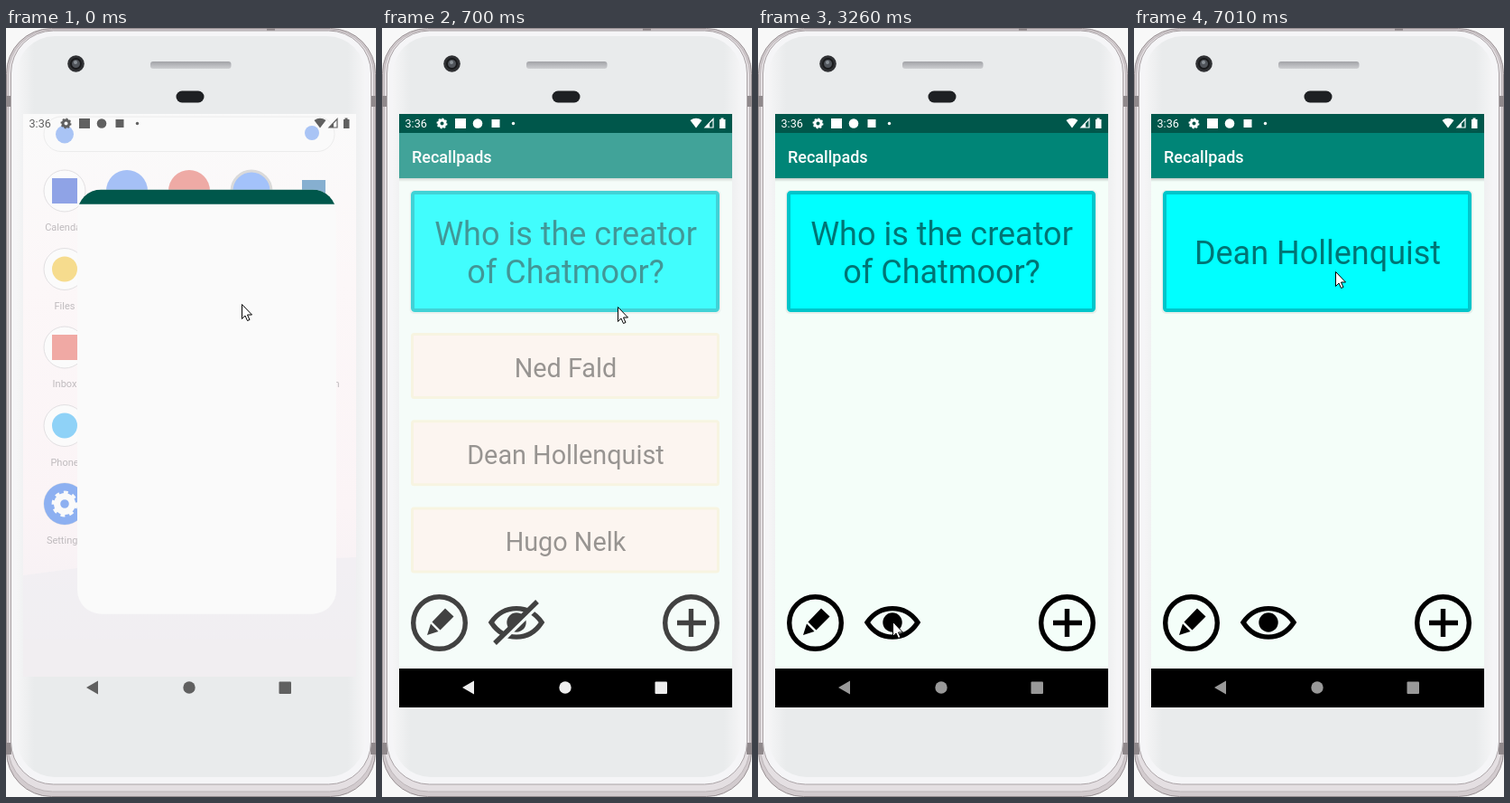
An HTML page for the animation above (8000 ms loop, 410 by 850 pixels).

```html
<!DOCTYPE html>
<html lang="en">
<head>
<meta charset="utf-8">
<title>Quiz card demo</title>
<style>
html, body { margin: 0; width: 100%; height: 100%; overflow: hidden; background: #f8f8f8 }
svg { display: block; font-family: Roboto, sans-serif }
.mid { text-anchor: middle }
.ask { font-size: 36px }
.reply { font-size: 28.8px }
.small { font-size: 11px; fill: #bfbbbe }
.line { fill: none; stroke: #000; stroke-width: 5.4 }
</style>
</head>
<body>
<svg width="410" height="850" viewBox="0 0 410 850">
  <defs>
    <clipPath id="clip"><rect id="clipRect" width="369"/></clipPath>
    <linearGradient id="wall" x2="0" y2="1">
      <stop offset="0" stop-color="#fafafa"/><stop offset=".3" stop-color="#fcf7f8"/>
      <stop offset=".7" stop-color="#fbf4f6"/><stop offset="1" stop-color="#f3eff3"/>
    </linearGradient>
    <linearGradient id="face">
      <stop offset="0" stop-color="#f5f5f6"/><stop offset=".05" stop-color="#e9ebec"/>
      <stop offset=".95" stop-color="#e9ebec"/><stop offset="1" stop-color="#f5f5f6"/>
    </linearGradient>
    <linearGradient id="slot" x2="0" y2="1">
      <stop offset="0" stop-color="#a2a3a7"/><stop offset="1" stop-color="#cdced1"/>
    </linearGradient>
    <linearGradient id="shade" x2="0" y2="1">
      <stop offset="0" stop-opacity=".2"/><stop offset="1" stop-opacity="0"/>
    </linearGradient>
    <g id="gear" fill="none">
      <circle r="3.5" stroke-width="3"/>
      <circle r="5" stroke-width="2" pathLength="16" stroke-dasharray="1"/>
    </g>
  </defs>

  <!-- phone body -->
  <rect x=".5" y=".5" width="409" height="849" rx="50" fill="#d2cbce" stroke="#989093"/>
  <rect x="2.5" y="2" width="405" height="842" rx="49" fill="#e4dfe2" stroke="#bcb5b8"/>
  <path d="M0 75H6V87H0ZM404 75H410V87H404ZM0 790H6V803H0ZM404 790H410V803H404ZM289 0H298V3H289Z" fill="#8f888b"/>
  <rect x="5.5" y="3" width="399" height="833" rx="47" fill="#f5f5f7" stroke="#aaa3a6"/>
  <rect x="12" y="9" width="386" height="819" rx="42" fill="url(#face)"/>
  <circle cx="77.5" cy="39.5" r="9.3" fill="#303134"/>
  <circle cx="77.5" cy="39.5" r="5.5" fill="#50545a" stroke="#191a1c" stroke-width="2"/>
  <circle cx="77" cy="38" r="2" fill="#8a9097"/>
  <rect x="160" y="37" width="89.5" height="8" rx="3" fill="url(#slot)"/>
  <rect x="188.5" y="69.5" width="31" height="13" rx="6.5" fill="#1e2023"/>

  <!-- launcher -->
  <path d="M19 95H388V717H19Z" fill="url(#wall)"/>
  <path d="M19 605L79 597L388 585V675H19Z" fill="#efeef2" opacity=".7"/>
  <path d="M19 675H388V717H19Z" fill="#f1eef1"/>
  <g id="home">
    <rect x="42" y="98" width="322" height="38.5" rx="19" fill="#fafafa" stroke="#ececec"/>
    <circle cx="65" cy="117.5" r="10" fill="#a9c4f5"/>
    <circle cx="339" cy="116" r="8" fill="#a9c4f5"/>
    <g id="apps" class="small mid"></g>
    <circle cx="134" cy="180" r="23" fill="#a5c0f6"/>
    <circle cx="203" cy="180" r="23" fill="#eeaaa5"/>
    <circle cx="272" cy="180" r="22" fill="#a3c2fa" stroke="#dadada" stroke-width="3"/>
    <path d="M328 168H354V194H328Z" fill="#86afd0"/>
    <circle cx="65" cy="526" r="23" fill="#8db0f1"/>
    <use href="#gear" transform="translate(65 526) scale(2.4)" stroke="#fafafa"/>
    <text class="small mid" x="366.5" y="397">n</text>
  </g>

  <!-- app window -->
  <g id="win">
    <g clip-path="url(#clip)">
      <g transform="translate(-19 -95)">
        <path d="M19 95H388V751H19Z" fill="#fafafa"/>
        <path d="M19 95H388V116H19Z" fill="#00574b"/>
        <path d="M19 708H388V751H19Z"/>
        <g id="page">
          <path d="M19 116H388V708H19Z" fill="#f4fef9"/>
          <path d="M19 116H388V166H19Z" fill="#008577"/>
          <path d="M19 166H388V170H19Z" fill="url(#shade)"/>
          <text x="33" y="148.5" font-size="18" font-weight="500" fill="#fff">Recallpads</text>
          <rect x="30.5" y="179" width="345" height="137" rx="5" opacity=".06"/>
          <rect x="34" y="182" width="338" height="130" rx="2.5" fill="#0ff" stroke="#00c5ca" stroke-width="4"/>
          <g class="mid ask" fill-opacity=".54">
            <g id="question">
              <text x="203.5" y="240">Who is the creator</text>
              <text x="203.5" y="282">of Chatmoor?</text>
            </g>
            <text id="solution" x="203.5" y="261">Dean Hollenquist</text>
          </g>
          <g id="answers" class="mid reply"></g>
          <circle class="line" cx="63.5" cy="657.5" r="28.8"/>
          <path d="M70 641.5L79.500 650.5L64.500 665.5L55.500 656.5ZM54 658.5L62.500 667L50 671Z"/>
          <circle class="line" cx="342.5" cy="657.5" r="28.8"/>
          <path class="line" d="M327 657.5H359M342.5 642V673"/>
          <path class="line" d="M121 657C135 636.5 163 636.5 177 657C163 678.5 135 678.5 121 657Z"/>
          <circle cx="149" cy="657" r="10.7"/>
          <g id="slash">
            <path d="M127 683L176 635" stroke="#f4fef9" stroke-width="5"/>
            <path class="line" d="M125 680L172 634"/>
          </g>
        </g>
      </g>
    </g>
  </g>

  <!-- system bars -->
  <g id="status" fill="currentColor">
    <text x="25.5" y="110" font-size="12.6">3:36</text>
    <use href="#gear" x="66.5" y="105.5" stroke="currentColor"/>
    <path d="M81 100H93V111H81ZM121.5 101H130.5V110H121.5Z"/>
    <circle cx="106" cy="105.5" r="5.3"/>
    <circle cx="145.5" cy="105.5" r="1.7"/>
    <path d="M341.5 102Q348 97.5 354.5 102L348 110.5ZM358 110H363V105Z"/>
    <path d="M358 110H367V100.5Z" fill="none" stroke="currentColor" stroke-width="1.2"/>
    <path d="M374 101H375.5V99.5H378.5V101H380.5V111H374Z"/>
  </g>
  <g id="nav" fill="currentColor">
    <path d="M89 729L102 721.5V736.5Z"/>
    <circle cx="203" cy="729" r="6.7"/>
    <rect x="302.5" y="722.5" width="13.5" height="13.5" rx="1"/>
  </g>
  <path id="cursor" d="M.5 .5V16.500L4 13L6.500 18.500L9 17.500L6.500 12H11.500Z" fill="#fff" stroke="#000"/>
</svg>
<script>
const $ = id => document.getElementById(id);
const LOOP = 8000, STEP = 70, HIDE = 3260, FLIP = 6730;

const apps = [['Calendar', '#8fa3e6'], ['Files', '#f6dc8e'], ['Inbox', '#f0a9a4'], ['Phone', '#8fd2f7'], ['Settings', 'none']];
$('apps').innerHTML = apps.map(([name, color], i) => {
  const y = 180 + i * 86.5;
  return `<circle cx="65" cy="${y}" r="23" fill="#fbfbfb" stroke="#e2e0e2"/>
    <rect x="51" y="${y - 14}" width="28" height="28" rx="${i % 2 * 14}" fill="${color}"/>
    <text x="65" y="${y + 44}">${name}</text>`;
}).join('');

$('answers').innerHTML = ['Ned Fald', 'Dean Hollenquist', 'Hugo Nelk'].map((name, i) => {
  const y = 337 + i * 96.3;
  return `<rect x="33.5" y="${y + 1.5}" width="339" height="70" rx="2" fill="#fef4ed" stroke="#f7f3d9" stroke-width="3"/>
    <text x="203.5" y="${y + 48.5}" fill-opacity=".54">${name}</text>`;
}).join('');

// Bursts of activity: start, end, and where the cursor arrives.
const bursts = [
  [0, 350, 261, 305], [610, 1240, 284, 522], [1240, 1380, 240, 583], [1440, 1760, 193, 606],
  [2540, 2690, 140, 650], [2840, 2960, 149, 656], [4390, 4880, 227, 141], [4880, 5080, 224, 269],
  [7010, 7010, 223, 269]];

const clamp = p => Math.min(1, Math.max(0, p));
const ease = p => p * p * p * (10 - 15 * p + 6 * p * p);
const mix = (a, b, p) => a + (b - a) * p;
const set = (id, attrs) => { for (const k in attrs) $(id).setAttribute(k, attrs[k]); };
const show = (id, on) => set(id, { display: on ? 'inline' : 'none' });
const gray = v => `rgb(${[v, v, v].map(Math.round)})`;

function draw(time) {
  // The picture refreshes every STEP within a burst and rests between bursts.
  const i = bursts.findLastIndex(b => b[0] <= time);
  const [start, end, x, y] = bursts[i];
  const t = time >= end ? end : start + Math.floor((time - start) / STEP) * STEP;

  const from = bursts[Math.max(0, i - 1)];
  const p = t >= end ? 1 : ease((t - start) / (end - start));
  set('cursor', { transform: `translate(${Math.round(mix(from[2], x, p))} ${Math.round(mix(from[3], y, p))})` });

  const rest = t < 350 ? Math.exp(-t / 60) : 0;
  set('win', { transform: `translate(${19 + 60 * rest} ${95 + 83.5 * rest}) scale(${1 - .222 * rest})` });
  set('clipRect', { height: 656 - 53 * rest ** 1.3, rx: 34 * rest * rest });
  set('home', { opacity: rest });
  set('page', { opacity: clamp((t - 540) / 190) });
  set('status', { color: gray(mix(255, 96, rest)) });
  set('nav', { color: gray(mix(238, 96, rest) - 85 * clamp((t - 1000) / 380)) });

  show('answers', time < HIDE);
  show('slash', time < HIDE);
  show('question', time < FLIP);
  show('solution', time >= FLIP);
}

const begin = performance.now();
function frame() {
  draw((performance.now() - begin) % LOOP);
  requestAnimationFrame(frame);
}
frame();
</script>
</body>
</html>
```
